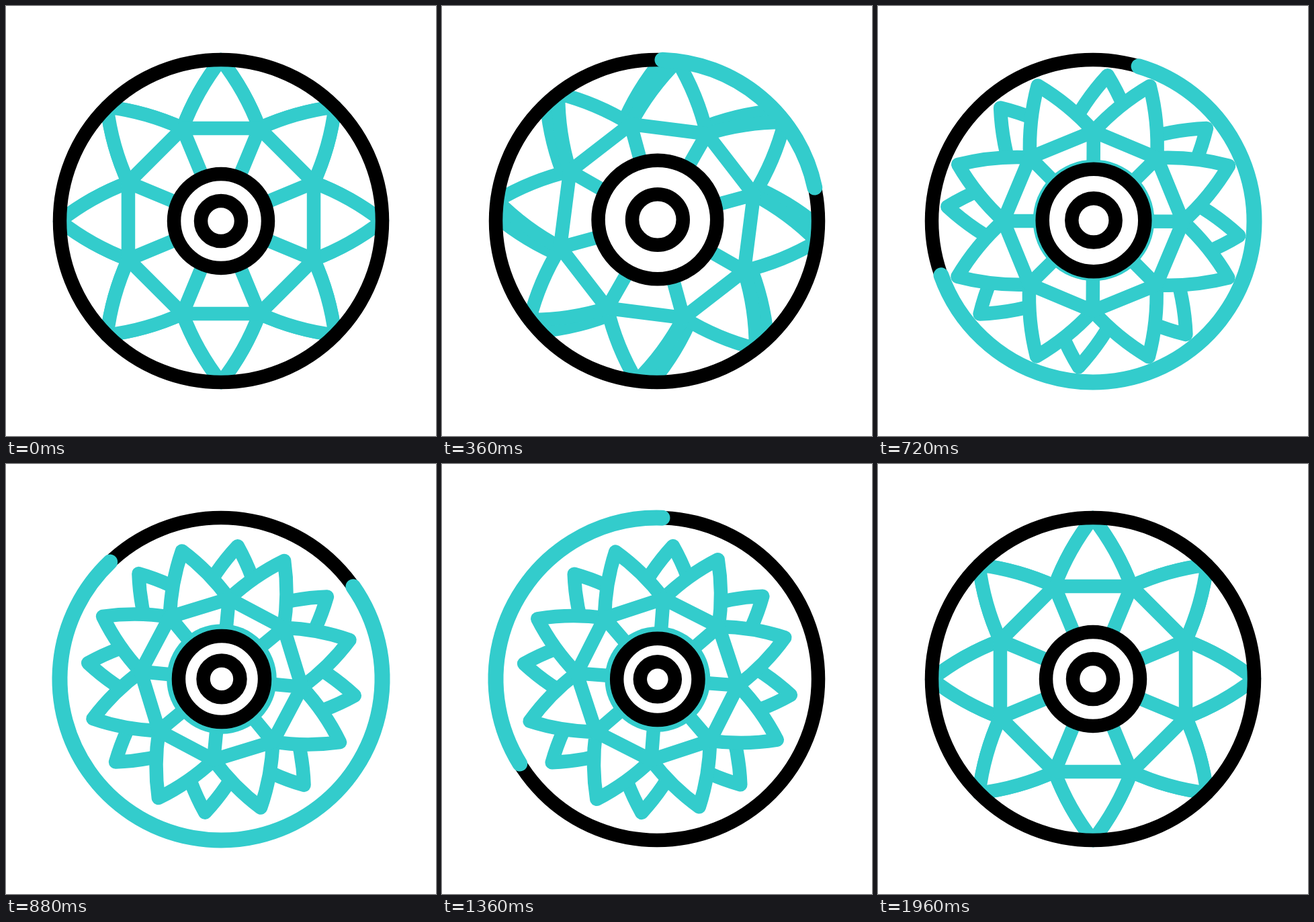
An HTML page with a canvas that plays this animation: 640 px wide and 640 px high, repeating every 2 s.

```html
<!DOCTYPE html>
<html lang="en">
<head>
<meta charset="utf-8">
<title>Wheel</title>
<style>
html, body { margin: 0; width: 100%; height: 100%; overflow: hidden; background: #fff; }
canvas { display: block; width: 100vw; height: 100vh; }
</style>
</head>
<body>
<canvas id="stage"></canvas>
<script>
const LOOP = 2000, STEP = 40, SIZE = 640, MID = 320;
const TEAL = '#33cccc', BLACK = '#000', WHITE = '#fff';
const TAU = Math.PI * 2, RAD = Math.PI / 180, PETALS = 8;

const canvas = document.getElementById('stage');
const ctx = canvas.getContext('2d');
const dpr = window.devicePixelRatio || 1;
canvas.width = canvas.height = SIZE * dpr;

// Eased progress from 0 to 1 between two times
function ease(t, from, to) {
  const u = Math.min(1, Math.max(0, (t - from) / (to - from)));
  return u * u * (3 - 2 * u);
}

// Point at a radius and a clockwise angle in degrees from the top
function polar(r, deg) {
  return [r * Math.sin(deg * RAD), -r * Math.cos(deg * RAD)];
}

function ring(x, y, r, width, color, fill) {
  ctx.beginPath();
  ctx.arc(x, y, r, 0, TAU);
  if (fill) {
    ctx.fillStyle = fill;
    ctx.fill();
  }
  ctx.lineWidth = width;
  ctx.strokeStyle = color;
  ctx.stroke();
}

// Curved side that bulges away from the petal's axis
function side(a, b, bulge) {
  const dx = b[0] - a[0], dy = b[1] - a[1], len = Math.hypot(dx, dy);
  ctx.quadraticCurveTo(
    (a[0] + b[0]) / 2 + dy / len * bulge,
    (a[1] + b[1]) / 2 - dx / len * bulge,
    b[0], b[1]);
}

function flower(base, tip, turn, inner) {
  const scale = tip / 240, slice = 360 / PETALS;
  ctx.save();
  ctx.rotate(turn * RAD);
  ctx.lineWidth = 20.5;
  ctx.lineJoin = 'round';
  ctx.lineCap = 'butt';
  ctx.strokeStyle = TEAL;
  ctx.fillStyle = WHITE;

  ctx.beginPath();
  ctx.moveTo(...polar(base, -slice / 2));
  for (let i = 0; i < PETALS; i++) {
    const a = polar(base, (i - 0.5) * slice);
    const b = polar(tip, i * slice);
    const c = polar(base, (i + 0.5) * slice);
    side(a, b, 9 * scale);
    side(b, c, 9 * scale);
  }
  ctx.closePath();
  ctx.fill();
  ctx.stroke();

  if (inner) {
    ctx.beginPath();
    for (let i = 0; i < PETALS; i++) {
      ctx.lineTo(...polar(base, (i + 0.5) * slice));
    }
    ctx.closePath();
    for (let i = 0; i < PETALS; i++) {
      ctx.moveTo(...polar(base, (i + 0.5) * slice));
      ctx.lineTo(...polar(40, (i + 0.5) * slice));
    }
    ctx.stroke();
  }
  ctx.restore();
}

function draw(t) {
  const spin = ease(t, 40, 1040) - ease(t, 1230, 1875);
  const shrink = ease(t, 440, 1040) - ease(t, 1155, 1925);
  const swell = ease(t, 80, 440) - ease(t, 440, 1040);
  const squeeze = ease(t, 440, 1040) - ease(t, 1155, 1865);

  ctx.setTransform(dpr, 0, 0, dpr, 0, 0);
  ctx.fillStyle = WHITE;
  ctx.fillRect(0, 0, SIZE, SIZE);
  ctx.translate(MID, MID);

  // Two flowers, the front one turning four times as far
  const base = 149.4 * (1 - 0.235 * shrink);
  const tip = 240 * (1 - 0.203 * shrink);
  ctx.save();
  ctx.translate(0.6 * shrink, 0.6 * shrink);
  flower(base, tip, 7.5 * spin, false);
  flower(base, tip, 30 * spin, true);
  ctx.restore();

  // Hub
  const size = 1 + 0.3 * swell - 0.167 * squeeze;
  const x = swell + shrink, y = 0.4 * shrink - 2.3 * swell;
  ctx.beginPath();
  ctx.arc(x, y, 70 * size + 9.5 + 10 * shrink, 0, TAU);
  ctx.fillStyle = TEAL;
  ctx.fill();
  ring(x, y, 70 * size, 20.5, BLACK, WHITE);
  ring(x, y, 30 * size, 20.5, BLACK, WHITE);

  // Rim and the band that sweeps round it
  ring(0, 0, 240, 20.5, BLACK);
  const head = ease(t, 40, 1120), tail = ease(t, 560, 1880);
  if (head > tail) {
    const zero = 1.9 * RAD - TAU / 4;
    ctx.beginPath();
    ctx.arc(0, 0, 240, zero + tail * TAU, zero + head * TAU);
    ctx.lineWidth = 23;
    ctx.lineCap = 'round';
    ctx.strokeStyle = TEAL;
    ctx.stroke();
  }
}

const start = performance.now();

function tick() {
  const now = Math.max(0, performance.now() - start) % LOOP;
  const t = Math.floor(now / STEP) * STEP;
  draw(t < 80 || t >= 1960 ? 0 : t);
  requestAnimationFrame(tick);
}
tick();
</script>
</body>
</html>
```
